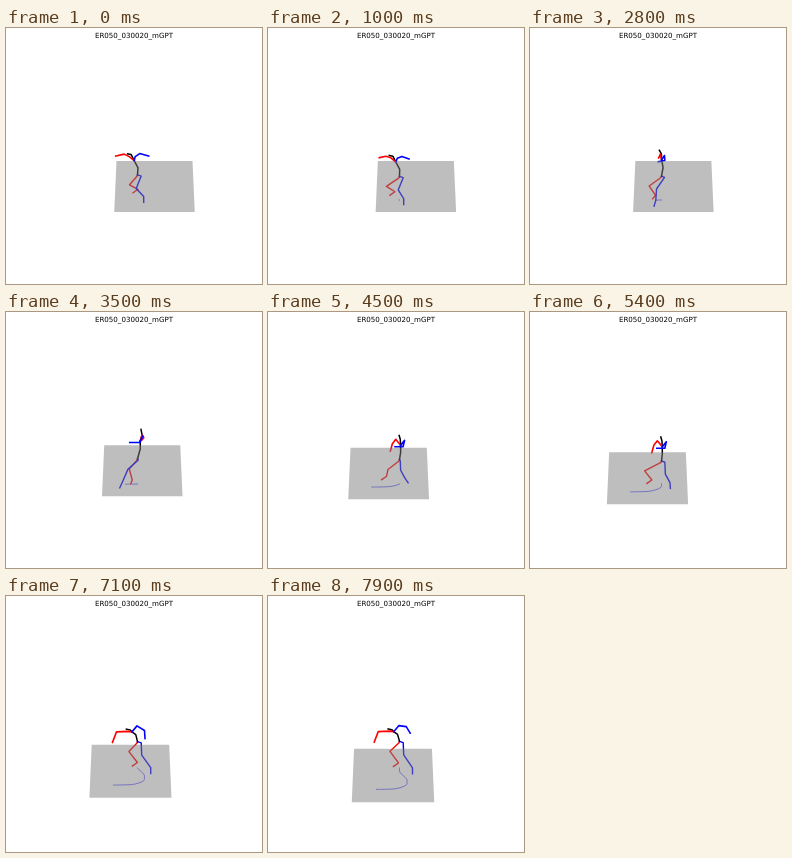
Recreate the animation shown at these times as an HTML page with a canvas. Size 256x256 px, loop 8 s.

```html
<!DOCTYPE html>
<html lang="en">
<head>
<meta charset="utf-8">
<title>Motion preview</title>
<style>
html, body { margin: 0; width: 100%; height: 100%; overflow: hidden; background: #fff; }
canvas, svg { position: absolute; left: 0; top: 0; width: 256px; height: 256px; display: block; }
text { font: 7.1px "DejaVu Sans", sans-serif; text-rendering: geometricPrecision; }
</style>
</head>
<body>
<canvas id="stage" width="256" height="256"></canvas>
<svg viewBox="0 0 256 256"><text x="128" y="10.1" text-anchor="middle">ER050_030020_mGPT</text></svg>
<script>
const ctx = document.getElementById('stage').getContext('2d');
const LOOP = 8000, STEP = 100, ROOT_X = 131.5, TRAIL_Y = 172;

const clamp = u => Math.max(0, Math.min(1, u));
function ramp(t, from, to) {
  const u = clamp((t - from) / (to - from));
  return u * u * (3 - 2 * u);
}
const bump = (t, mid, width) => Math.exp(-(((t - mid) / width) ** 2));

// Joint positions from a start point and successive bone vectors
function chain(start, ...bones) {
  const pts = [start];
  for (const [x, y] of bones) {
    const [px, py] = pts[pts.length - 1];
    pts.push([px + x, py + y]);
  }
  return pts;
}

function pose(t) {
  const q = t / LOOP;
  const gait = Math.cos(2 * Math.PI * t / 3700);
  const upright = ramp(t, 2000, 3400) * (1 - ramp(t, 5400, 6400));
  const lean = ramp(t, 5400, 6900);
  const open = ramp(t, 6000, 7900);
  const fold = bump(t, 2000, 700);    // arms drawn in
  const turn = bump(t, 3300, 600);    // body seen edge-on
  const side = bump(t, 4000, 900);
  const plant = bump(t, 4400, 700);   // red foot lands
  const crouch = bump(t, 5000, 700);

  const root = [ROOT_X, 148.2 - 1.4 * gait - 2 * q ** 3];
  const spine = chain(root,
    [0.5 - 2.5 * q + 2 * upright + 1.5 * turn, -7 - 3 * turn],
    [-3.8 + 3.8 * upright, -7.2 + 4.5 * lean - turn],
    [-3 + 2.6 * upright + 2.5 * turn + lean, -6 + 4 * lean],
    [-3.6 + 2.5 * upright, -0.7 - 3 * upright - 2 * turn]);
  const chest = spine[2];

  const redLeg = chain(root,
    [-0.5, 1.5],
    [-12 + 4.5 * gait, 8.5],
    [8.5 - 10 * plant - 4 * turn, 4.5 + 7.2 * q + 4.5 * turn - 2 * plant],
    [-5 + 4 * turn, 3.5]);
  const blueLeg = chain(root,
    [3.7 - 4 * side, 1.3],
    [-5 + 5.5 * ramp(t, 3500, 4500) - 6 * turn, 12.3 - 4 * side],
    [5.5 + 2 * gait + 2 * q - 13 * turn - 3 * side, 8 + 5 * q - 4 * crouch + 3 * turn],
    [3 * plant - 3.5 * turn, 6 - 2 * plant]);

  const redArm = chain(chest,
    [-5 + 7.5 * turn + 1.5 * lean, -4 - 2.5 * fold - 2 * upright + 3.5 * lean],
    [-5 + 6 * turn - 7 * lean + 1.5 * upright,
      -2.5 + 7.5 * fold + 7 * upright - 2 * turn + 3 * lean],
    [-8.5 + 14.5 * fold + 6.5 * upright + 4.5 * lean,
      2 - 4.5 * fold + 5.5 * upright + 8.5 * lean - 6 * turn]);
  const blueArm = chain(chest,
    [1 + 3 * fold + 3 * upright - 1.5 * turn + 4 * lean, -4 + fold - upright - 2 * lean],
    [4.5 + fold - 6 * upright - 1.5 * turn + 3 * lean,
      -3 + 8.5 * fold + 9.5 * upright + 13.5 * lean - 9.5 * open],
    [9 - 14.5 * fold - 17 * upright - 2.5 * turn - 14 * lean + 9 * open,
      2.5 + 0.5 * fold - 2.5 * upright + 8 * lean - 4 * open]);

  return { spine, redLeg, blueLeg, redArm, blueArm };
}

// Floor drift: sweeps left, eases back, and comes steadily closer
function offset(t) {
  const x = -5 * clamp(t / 2800) ** 2 - 26 * ramp(t, 2700, 5000) + 7.5 * ramp(t, 5600, 7400);
  const d = t - 3970;
  return [x, 0.00568 * (d + Math.hypot(d, 300)) / 2];
}

function trace(pts) {
  ctx.beginPath();
  pts.forEach(p => ctx.lineTo(p[0], p[1]));
}
function line(pts, color, width) {
  trace(pts);
  ctx.strokeStyle = color;
  ctx.lineWidth = width;
  ctx.stroke();
}

function drawTrail(t, dx, dy) {
  const pts = [];
  for (let s = 0; s <= t; s += STEP) {
    const [px, py] = offset(s);
    pts.push([ROOT_X + dx - px, TRAIL_Y + (dy - py) * 0.96]);
  }
  if (pts.length > 1) line(pts, '#00f', 0.6);
}

// Translucent floor tints whatever it covers
function drawFloor(dx, dy) {
  const zoom = 1 + dy * 0.0011, mid = 148.5 + dx;
  const back = 133 + dy * 0.88, front = 184 + dy;
  const near = 40.25 * zoom, far = 38 * zoom;
  trace([[mid - far, back], [mid + far, back], [mid + near, front], [mid - near, front]]);
  ctx.fillStyle = 'rgba(127,127,127,0.5)';
  ctx.fill();
}

function draw(t) {
  ctx.fillStyle = '#fff';
  ctx.fillRect(0, 0, 256, 256);
  ctx.lineJoin = 'round';
  ctx.lineCap = 'square';
  const [dx, dy] = offset(t);
  const p = pose(t);
  drawTrail(t, dx, dy);
  line(p.redLeg, '#f00', 1.4);
  line(p.blueLeg, '#00f', 1.4);
  line(p.spine, '#000', 1.5);
  line(p.redArm, '#f00', 1.6);
  line(p.blueArm, '#00f', 1.6);
  drawFloor(dx, dy);
}

function tick() {
  draw(Math.floor(performance.now() % LOOP / STEP) * STEP);
  requestAnimationFrame(tick);
}
tick();
</script>
</body>
</html>
```
